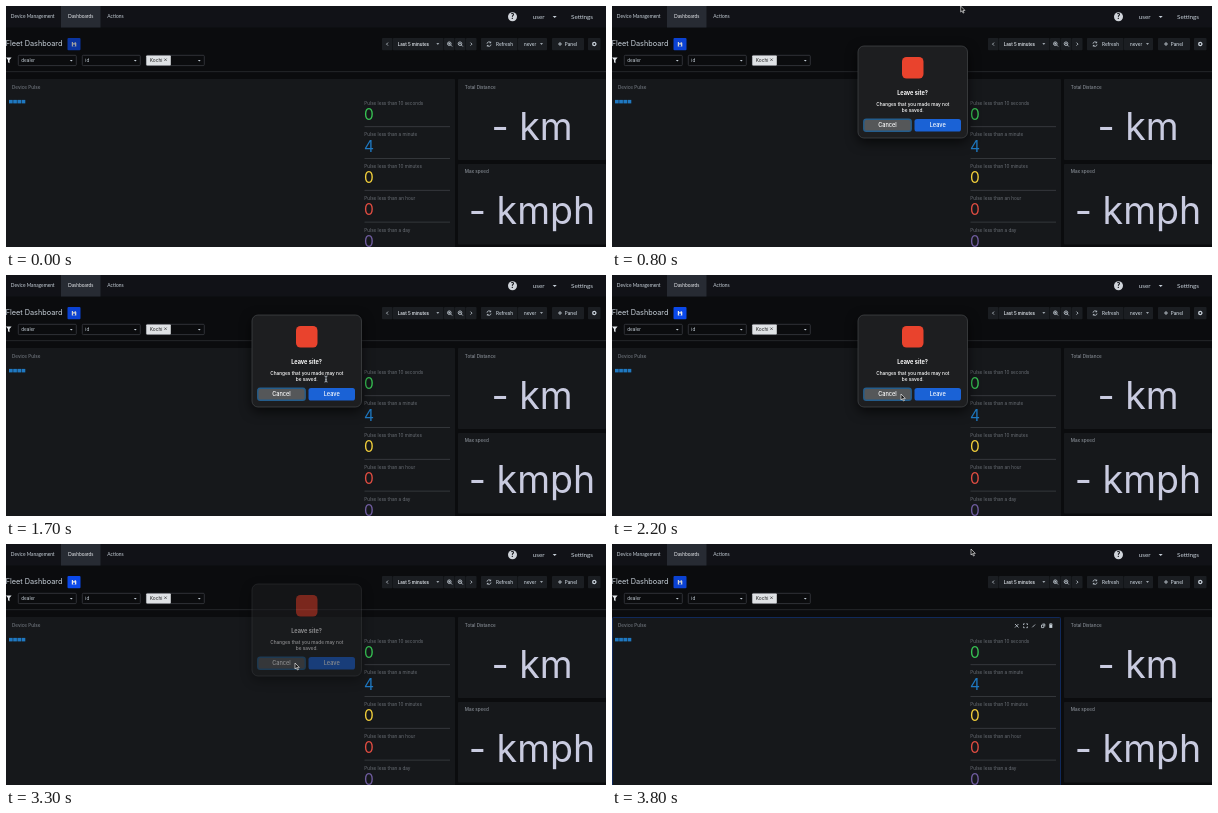
Animation, 600 px wide and 241 px high, one loop 3.9 s. Source, as an HTML page:

```html
<!DOCTYPE html>
<html lang="en">
<head>
<meta charset="utf-8">
<title>Fleet Dashboard</title>
<style>
  html, body { margin: 0; width: 100%; height: 100%; overflow: hidden; background: #0b0c0e; }
  svg { display: block; width: 600px; height: 241px; font: 4.6px Inter, sans-serif; fill: #c7d0d9; }
  .line { fill: none; stroke: #c7d0d9; stroke-width: .8; }
  .nav { font-family: Lato, sans-serif; }
  .mac { text-anchor: middle; fill: #fff; font-weight: 500; }
  #frame { filter: drop-shadow(0 4px 6px #000a); }
</style>
</head>
<body>
<svg viewBox="0 0 600 241">
  <g id="page"></g>
  <g id="save">
    <rect x="61.5" y="32" width="13" height="12.3" rx="1" fill="#0b4fff"/>
    <path d="M65.8 36h3.4l1.1 1.1v3.3h-4.5z" fill="#fff"/>
    <path d="M67 36h1.7v1.2H67zM67 38.5h2v1.9h-2z" fill="#0b4fff"/>
  </g>
  <g id="hover">
    <rect x=".5" y="73.5" width="448" height="170" rx="1" fill="none" stroke="#10295a"/>
    <path class="line" d="M403 80l3.5 3.5m0-3.5l-3.5 3.5M411.5 81v-1.2h1.2m1.6 0h1.2v1.2m0 1.5v1.2h-1.2m-1.6 0h-1.2v-1.2M420.3 83.3l2.8-2.8M429.500 81h2.3v2.6h-2.3zM430.5 80h2.3v2.5M437 80.3h3.6m-2.8-.5h2"/>
    <path d="M437.300 81h3v2.900h-3z"/>
  </g>
  <g id="dialog">
    <rect id="frame" x="246" y="40" width="109.500" height="92" rx="6" fill="#1d1e20" stroke="#46484b" stroke-width=".7"/>
    <rect x="290" y="51" width="21.500" height="21.500" rx="4.500" fill="#e9432d"/>
    <g class="mac">
      <text x="300.500" y="89.300" font-size="5.600" style="font-weight:700">Leave site?</text>
      <text x="300.800" y="99.600" font-size="4.750">Changes that you made may not</text>
      <text x="300.800" y="105.600" font-size="4.750">be saved.</text>
      <rect x="251.800" y="113.300" width="47.400" height="12" rx="2.600" fill="#555759" stroke="#245d8c" stroke-width="1.400"/>
      <rect x="302.500" y="113" width="46.500" height="12.500" rx="2.600" fill="#1a62d6"/>
      <text x="275.500" y="121.300" font-size="5.600">Cancel</text>
      <text x="325.700" y="121.300" font-size="5.600">Leave</text>
    </g>
  </g>
  <g id="cursor">
    <path id="arrow" d="M0 0v6l1.400-1.300 1 2.300 1-.4-1-2.200h1.900z" fill="#111" stroke="#fff" stroke-width=".6"/>
    <path id="beam" d="M-1.500-3q1.500 0 1.500 1v4q0 1-1.500 1M1.500-3Q0-3 0-2m0 4q0 1 1.500 1M-.8.8H.8" class="line"/>
  </g>
</svg>
<script>
const $ = id => document.getElementById(id);
const parts = [];
const rect = (x, y, w, h, fill, extra = '') =>
  parts.push(`<rect x="${x}" y="${y}" width="${w}" height="${h}" fill="${fill}" ${extra}/>`);
const text = (x, y, str, size = 4.6, fill = '#c7d0d9', weight = 400, extra = '') =>
  parts.push(`<text x="${x}" y="${y}" font-size="${size}" fill="${fill}" font-weight="${weight}" ${extra}>${str}</text>`);
const navText = (x, y, str, size = 4.85, fill, weight) => text(x, y, str, size, fill, weight, 'class="nav"');
const line = (d, extra = '') => parts.push(`<path class="line" d="${d}" ${extra}/>`);
const caret = (x, y, s = 1.5) => parts.push(`<path d="M${x - s} ${y - s / 2}h${2 * s}l${-s} ${s}z"/>`);

// Navigation
rect(0, 0, 600, 21.5, '#111217');
rect(55, 0, 39.500, 21.5, '#272b33');
navText(4.8, 12.4, 'Device Management');
navText(62, 12.4, 'Dashboards', 4.9, '#e4e7eb');
navText(101.300, 12.4, 'Actions', 4.9);
parts.push('<circle cx="506.500" cy="10.700" r="4.500" fill="#d0d4da"/>');
navText(504.7, 13.3, '?', 7.4, '#111217', 900);
navText(526.8, 13, 'user', 6.3);
caret(548.7, 11, 2);
navText(565, 13, 'Settings', 6.3);

// Title and toolbar
text(-.3, 40.2, 'Fleet Dashboard', 7.3);
for (const [x, w] of [[376, 10.5], [387, 50.5], [438, 10.5], [449, 10.5], [460, 10.5],
  [475, 36.5], [512, 29], [546, 32], [582, 12.5]])
  rect(x, 32, w, 12.300, '#1b1e22', 'rx=".8"');
line('M382 36.600l-1.500 1.500 1.500 1.500M464.500 36.600l1.500 1.500-1.500 1.500M554 36v4m-2-2h4');
for (const [x, sign] of [[443.3, 'm-1 0h2m-1-1v2'], [454, 'm-1 0h2']])
  line(`M${x + 1.3} 39l1.500 1.500M${x - 1.8} 37.700a1.800 1.800 0 1 0 3.600 0a1.800 1.800 0 1 0-3.600 0M${x} 37.700${sign}`);
text(391.8, 39.8, 'Last 5 minutes', 4.45, '#d8dde3', 600);
caret(431.8, 38);
line('M481 37.700a2 2 0 0 1 3.700-.9v-1.200m0 1.200h-1.200M485 38.500a2 2 0 0 1-3.700.9v1.200m0-1.200h1.200');
text(490, 39.8, 'Refresh', 4.6, '#c7d0d9', 500);
text(518, 39.8, 'never', 4.5, '#c7d0d9', 500);
caret(535.5, 38);
text(558.7, 39.8, 'Panel', 4.7, '#c7d0d9', 500);
line('M586.700 38a1.600 1.600 0 1 0 3.200 0a1.600 1.600 0 1 0-3.200 0', 'style="stroke-width:1.300"');

// Filters
parts.push('<path d="M0 51.500h5.600L3.500 54v3.300l-1.500-1V54z" fill="#e4e7eb"/>');
for (const [x, label] of [[12.3, 'dealer'], [76.3, 'id'], [140.3, '']]) {
  rect(x, 49.300, 58, 10.300, '#0b0c0e', 'stroke="#3f4348" stroke-width=".7" rx="1"');
  text(x + 3, 56, label, 4.6);
  caret(x + 53, 54.7, 1.4);
}
rect(140.3, 49.500, 24.5, 10, '#dfe2e5', 'rx=".8"');
text(143.800, 56.2, 'Kochi', 4.8, '#222');
line('M158.300 52.500l2.400 2.400m0-2.400l-2.400 2.400', 'style="stroke:#222;stroke-width:.6"');
rect(0, 65.3, 600, .8, '#2a2c30');

// Panels
for (const [x, y, w, h] of [[0, 73, 449, 170], [452, 73, 148, 81], [452, 158, 148, 80.5]])
  rect(x, y, w, h, '#16181b', 'rx="1"');
text(6, 82.7, 'Device Pulse', 4.6, '#71777f', 500);
text(458.8, 82.7, 'Total Distance', 4.55, '#858b93', 500);
text(458.8, 167.3, 'Max speed', 4.55, '#858b93', 500);
text(526, 133.5, '- km', 37.5, '#c9cbe0', 400, 'text-anchor="middle"');
text(526, 218, '- kmph', 37.5, '#c9cbe0', 400, 'text-anchor="middle"');
for (let i = 0; i < 4; i++) rect(3 + i * 4.200, 93.900, 3.700, 3.500, '#1f78c1');

[['10 seconds', 0, '#37c353'], ['a minute', 4, '#1f78c1'], ['10 minutes', 0, '#f2cf3b'],
 ['an hour', 0, '#e24d42'], ['a day', 0, '#705da0']].forEach(([span, count, color], i) => {
  const y = i * 31.800;
  text(358.3, 98.600 + y, 'Pulse less than ' + span, 4.65, '#696e75');
  text(357.9, 113.800 + y, count, 15.5, color);
  rect(358.5, 120.300 + y, 85.500, .8, '#3b3e43');
});
$('page').innerHTML = parts.join('');

// Cursor stops: time, x, y
const stops = [[700, 352, -12], [1200, 320, 104], [1800, 320, 104], [2100, 289, 119],
  [3600, 289, 119], [3800, 359, 5]];
const clamp = v => Math.min(1, Math.max(0, v));
const ease = v => v * v * (3 - 2 * v);
const show = (id, on) => $(id).setAttribute('opacity', +on);

function cursorAt(t) {
  let [, x, y] = stops[0];
  for (let i = 1; i < stops.length; i++) {
    const [t0, x0, y0] = stops[i - 1], [t1, x1, y1] = stops[i];
    if (t < t0) break;
    const k = ease(clamp((t - t0) / (t1 - t0)));
    x = x0 + (x1 - x0) * k;
    y = y0 + (y1 - y0) * k;
  }
  return [x, y];
}

function draw(now) {
  const t = Math.floor(now % 3900 / 100) * 100;
  show('save', .74 + .26 * Math.cos((t - 500) / 1500 * 2 * Math.PI));

  const open = clamp((t - 400) / 200);
  const scale = .58 + .42 * open;
  show('dialog', t < 500 ? 0 : (.6 + .4 * open) * clamp((3400 - t) / 200));
  $('dialog').setAttribute('transform', `translate(300.800 86.300) scale(${scale}) translate(-300.800 -86.300)`);

  const [x, y] = cursorAt(t);
  const overText = t >= 1200 && t < 1900;
  $('cursor').setAttribute('transform', `translate(${x} ${y})`);
  show('arrow', !overText);
  show('beam', overText);
  show('hover', t >= 3700);
  requestAnimationFrame(draw);
}
requestAnimationFrame(draw);
</script>
</body>
</html>
```
